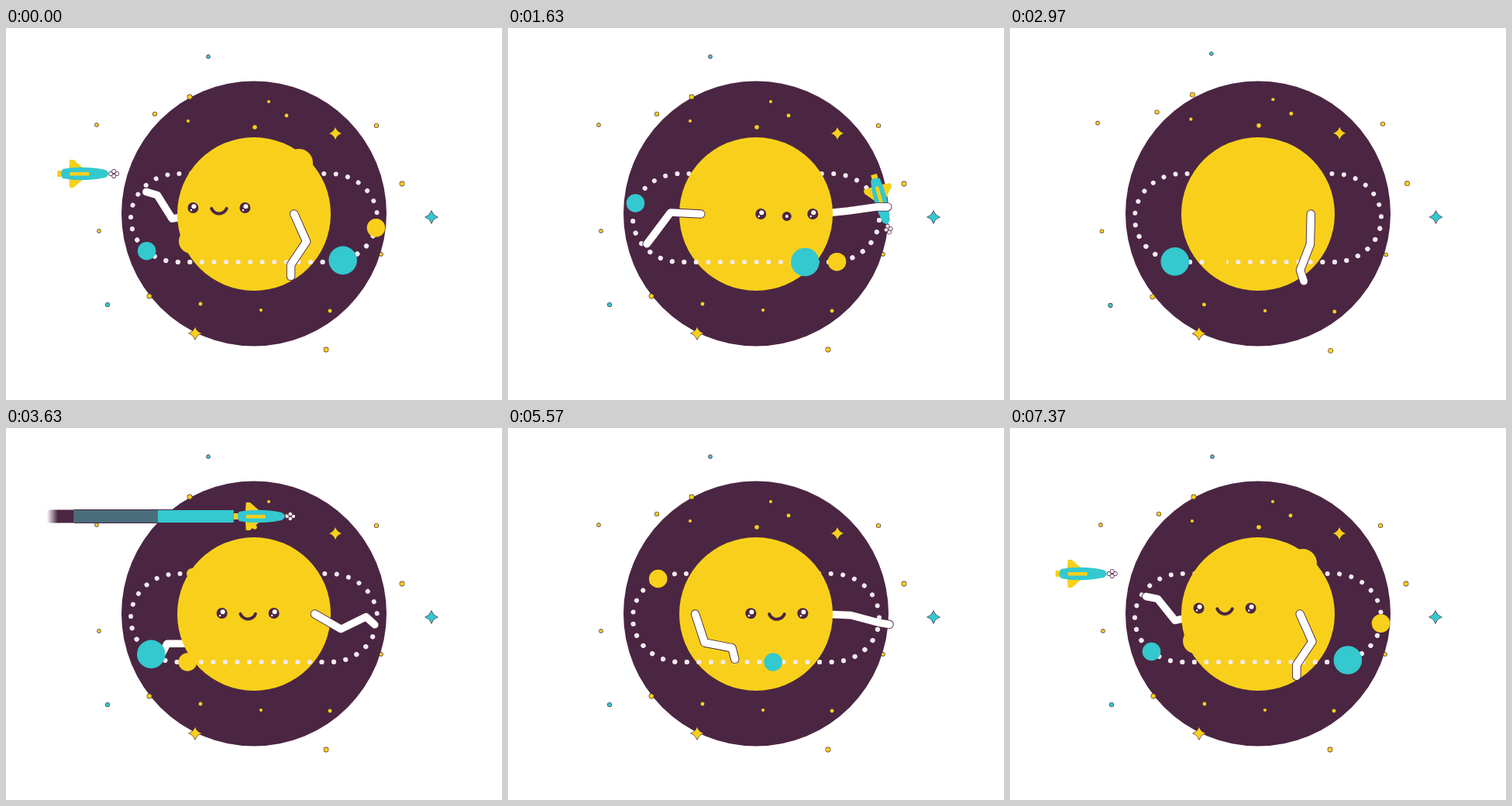
An HTML page with a canvas that plays this animation: 640x480 px, repeating every 7410 ms.

```html
<!DOCTYPE html>
<html lang="en">
<head>
<meta charset="utf-8">
<title>Spinning sun</title>
<style>
  html, body { margin: 0; width: 100%; height: 100%; overflow: hidden; background: #fff; }
  canvas { display: block; }
</style>
</head>
<body>
<canvas id="stage" width="640" height="480"></canvas>
<script>
const ctx = document.getElementById('stage').getContext('2d');
const LOOP = 7410, GRAB = 1630, THROW = 2180, TAU = Math.PI * 2, DEG = Math.PI / 180;
const PURPLE = '#4b2642', YELLOW = '#f8d01b', TEAL = '#34c8cf', SMOKE = '#496d7b', WHITE = '#fff', PALE = '#f3eaf0';
const CX = 320, CY = 240, SUN = 99;

// Orbit: two straight runs joined by half ellipses, measured clockwise from the top left.
const LEFT = 222, RIGHT = 418, MID = 245, RX = 61, RY = 57;
const RUN = RIGHT - LEFT, BEND = Math.PI * (RX + RY) / 2, LAP = 2 * (RUN + BEND);
const GAP = LAP / 49;

// Smooth interpolation through keys [time, value] without overshoot.
function track(keys) {
  const n = keys.length;
  const slope = keys.slice(1).map((k, i) => (k[1] - keys[i][1]) / (k[0] - keys[i][0]));
  const tangent = keys.map((_, i) => {
    const a = slope[Math.max(i - 1, 0)], b = slope[Math.min(i, n - 2)];
    return a * b > 0 ? 2 * a * b / (a + b) : 0;
  });
  return t => {
    if (t <= keys[0][0]) return keys[0][1];
    if (t >= keys[n - 1][0]) return keys[n - 1][1];
    let i = 0;
    while (t > keys[i + 1][0]) i++;
    const h = keys[i + 1][0] - keys[i][0], u = (t - keys[i][0]) / h, v = 1 - u;
    return keys[i][1] * v * v * (1 + 2 * u) + keys[i + 1][1] * u * u * (3 - 2 * u)
      + h * u * v * (tangent[i] * v - tangent[i + 1] * u);
  };
}

// Key poses: height of the face and the angles of upper arm, forearm and hand.
const HANG = [66, 124, 90];
const START = { face: 232, left: [171, 238, 196], right: HANG };
const POSES = [
  { at: 0, ...START },
  { at: GRAB, face: 240, left: [183, 127, 127], right: [-6, -8, 0] },
  { at: 2330, face: 240, left: [111, 45, 28], right: [60, 20, 20] },
  { at: 3630, face: 239, left: [79, 180, 117], right: [30, -26, 42] },
  { at: 4770, face: 236, left: [66, -12, 74], right: [-55, -83, -63] },
  { at: 6430, face: 243, left: [88, 68, 81], right: HANG },
  { at: LOOP, ...START }
];
const poseTrack = pick => track(POSES.map((p, i) => [p.at, pick(p, i)]));
const faceY = poseTrack(p => p.face);
const yaw = track([[0, -37], [GRAB, 32], [THROW, -110], [2330, -261], [3630, -726], [4770, -697], [6430, -705], [LOOP, -757]]);

// Shoulders sit on the turning sun; "seat" is their angle from the face.
const BONES = [39, 36, 15];
const arms = [['left', -90], ['right', 75]].map(([side, seat]) => ({
  seat, angles: BONES.map((_, j) => poseTrack(p => p[side][j]))
}));

// Distance along the orbit at each key pose; every planet does one lap per loop.
const planet = (color, r, stops) =>
  ({ color, r, s: poseTrack((_, i) => i < stops.length ? stops[i] : stops[0] + LAP) });
const planets = [
  planet(TEAL, 11.8, [620, 690, 737, 900, 1058, 1352]),
  planet(YELLOW, 11.8, [302, 375, 486, 565, 609, 915]),
  planet(TEAL, 18.3, [365, 416, 551, 613, 668, 1097])
];

const burst = track([[1900, 0], [2330, 1], [2480, 1], [3070, 0]]);
const approach = track([[-950, -275], [0, -122], [800, 60], [1300, 235], [GRAB, 262]]);

const STARS = [
  [117, 125], [192, 111], [237, 89], [339, 95], [362, 113], [321, 128], [235, 120], [478, 126],
  [511, 201], [484, 292], [418, 365], [413, 415], [329, 364], [251, 356], [185, 346], [120, 262]
];
const TEAL_STARS = [[261, 37], [131, 357]];
const SPARKS = [[425, 136, YELLOW], [244, 394, YELLOW], [549, 244, TEAL]];

// Lumps that swell out of the sun around a given time.
const LUMPS = [
  { at: 0, x: 378, y: 174, r: 18 }, { at: 0, x: 239, y: 275, r: 16 },
  { at: 3630, x: 240, y: 188, r: 7 }, { at: 4770, x: 367, y: 169, r: 18 }
];

function orbit(s) {
  if (s > 0) s %= LAP;
  if (s < RUN) return { x: LEFT + s, y: MID - RY, turn: 0 };
  s -= RUN;
  if (s < BEND) {
    const u = s / BEND * Math.PI;
    return { x: RIGHT + RX * Math.sin(u), y: MID - RY * Math.cos(u), turn: u };
  }
  s -= BEND;
  if (s < RUN) return { x: RIGHT - s, y: MID + RY, turn: Math.PI };
  const u = (s - RUN) / BEND * Math.PI;
  return { x: LEFT - RX * Math.sin(u), y: MID + RY * Math.cos(u), turn: Math.PI + u };
}

function disc(x, y, r, color) {
  ctx.fillStyle = color;
  ctx.beginPath();
  ctx.arc(x, y, r, 0, TAU);
  ctx.fill();
}

function rimmed(x, y, r, color) {
  disc(x, y, r + .6, PURPLE);
  disc(x, y, r, color);
}

function strokeLine(width, color) {
  ctx.lineWidth = width;
  ctx.strokeStyle = color;
  ctx.stroke();
}

function clipped(shape, paint) {
  ctx.save();
  ctx.beginPath();
  shape();
  ctx.clip();
  paint();
  ctx.restore();
}

function spark(x, y, color) {
  ctx.beginPath();
  ctx.moveTo(x, y - 8);
  for (let i = 1; i <= 4; i++) {
    const a = i * TAU / 4, m = a - TAU / 8;
    ctx.quadraticCurveTo(x + 2.8 * Math.sin(m), y - 2.8 * Math.cos(m), x + 8 * Math.sin(a), y - 8 * Math.cos(a));
  }
  strokeLine(1.2, PURPLE);
  ctx.fillStyle = color;
  ctx.fill();
}

function drawStars(t) {
  const b = burst(t);
  const place = (x, y, k) => [x + (x - CX) * k * b, y + (y - CY) * k * b];
  const star = color => ([x, y], i) =>
    rimmed(...place(x, y, y < 130 ? .1 : .04), 2.1 + i % 3 * .35, color);
  STARS.forEach(star(YELLOW));
  TEAL_STARS.forEach(star(TEAL));
  SPARKS.forEach(([x, y, color]) => spark(...place(x, y, .012), color));
}

function drawDots(t) {
  const p = t / LOOP, shift = 7 * GAP * p + 10 * Math.sin(Math.PI * p) ** 4;
  ctx.save();
  ctx.beginPath();
  ctx.moveTo(LEFT, MID - RY);
  ctx.lineTo(RIGHT, MID - RY);
  ctx.ellipse(RIGHT, MID, RX, RY, 0, -Math.PI / 2, Math.PI / 2);
  ctx.lineTo(LEFT, MID + RY);
  ctx.ellipse(LEFT, MID, RX, RY, 0, Math.PI / 2, Math.PI * 1.5);
  ctx.setLineDash([.01, GAP - .01]);
  ctx.lineDashOffset = -(1.4 + shift);
  ctx.lineCap = 'round';
  strokeLine(6, PALE);
  ctx.restore();
}

function drawPlanets(t, front) {
  planets.forEach(p => {
    const { x, y } = orbit(p.s(t));
    if ((y > MID) === front) disc(x, y, p.r, p.color);
  });
}

function armPose(arm, t) {
  const seat = (yaw(t) + arm.seat) * DEG;
  let x = CX + 84 * Math.sin(seat), y = CY;
  const points = [[x, y]];
  BONES.forEach((length, j) => {
    const a = arm.angles[j](t) * DEG;
    points.push([x += length * Math.cos(a), y += length * Math.sin(a)]);
  });
  return { points, hand: { x, y }, front: Math.cos(seat) > 0 };
}

function drawArms(poses, front) {
  ctx.lineCap = ctx.lineJoin = 'round';
  poses.filter(p => p.front === front).forEach(({ points }) => {
    ctx.beginPath();
    points.forEach(p => ctx.lineTo(...p));
    strokeLine(11.4, PURPLE);
    strokeLine(9.6, WHITE);
  });
}

function drawSun(t) {
  disc(CX, CY, SUN, YELLOW);
  LUMPS.forEach(({ at, x, y, r }) => {
    const gap = Math.abs(t - at), away = Math.min(gap, LOOP - gap) / 500;
    const out = .7 + .3 * Math.exp(-away * away);
    disc(CX + (x - CX) * out, CY + (y - CY) * out, r, YELLOW);
  });
}

function drawFace(t) {
  const angle = yaw(t) * DEG, facing = Math.cos(angle);
  if (facing <= 0) return;
  clipped(() => ctx.arc(CX, CY, SUN, 0, TAU), () => {
    ctx.translate(CX + 75 * Math.sin(angle), faceY(t));
    ctx.scale(Math.min(1, facing * 1.3), 1);
    for (const side of [-33.5, 33.5]) {
      disc(side, 0, 7, PURPLE);
      disc(side + 1, -1.8, 3, WHITE);
      disc(side - 2.5, 3, 1.2, WHITE);
    }
    if (t > 1250 && t < THROW) {
      disc(0, 3, 6, PURPLE);
      disc(0, 3, 2, WHITE);
    } else {
      ctx.beginPath();
      ctx.lineCap = 'round';
      ctx.arc(0, -3, 10.5, .12 * Math.PI, .88 * Math.PI);
      strokeLine(4, PURPLE);
    }
  });
}

// Follows the orbit, is swung by the hand, thrown left, then races back across the top.
function rocketState(t, arm) {
  if (t > 6430) t -= LOOP;
  const held = arm.front ? 'hand' : 'back';
  if (t < GRAB) {
    const p = orbit(approach(t));
    return { ...p, turn: p.turn * 1.18, layer: p.x > RIGHT ? 'hand' : 'back' };
  }
  if (t < THROW) {
    const u = (t - GRAB) / (THROW - GRAB);
    return { x: arm.hand.x - 9 * (1 - u), y: arm.hand.y - 9 * (1 - u), turn: (75 + 105 * u) * DEG, layer: held };
  }
  if (t < 2560) {
    return { x: 340 - (t - THROW) * 2.96, y: 302, turn: Math.PI, layer: 'front', tail: [175, SMOKE] };
  }
  if (t > 3150 && t < 4400) {
    return { x: 327 + (t - 3630) * .76, y: 114, turn: 0, layer: 'front', tail: [35, PURPLE] };
  }
  return null;
}

// Drawn in the rocket's own frame, so it always streams out behind.
function drawTrail([length, color]) {
  const bright = -34 - 98, dim = bright - 108;
  const fade = ctx.createLinearGradient(dim, 0, dim - length, 0);
  fade.addColorStop(0, color);
  fade.addColorStop(.6, color + (color === SMOKE ? '18' : 'ff'));
  fade.addColorStop(1, color + '00');
  ctx.fillStyle = fade;
  ctx.fillRect(dim - length, -8.5, length, 17);
  ctx.fillStyle = PURPLE;
  ctx.fillRect(dim, -9, 206, 18);
  ctx.fillStyle = SMOKE;
  ctx.fillRect(dim, -8, 108, 16);
  ctx.fillStyle = TEAL;
  ctx.fillRect(bright, -8, 98, 16);
}

function drawRocket({ x, y, turn, tail }) {
  ctx.save();
  ctx.translate(x, y);
  ctx.rotate(turn);
  if (tail) {
    // The thrown streak begins where the hand let go.
    const reach = turn ? 340 - x : 400;
    clipped(() => ctx.rect(-reach, -10, reach, 20), () => drawTrail(tail));
  }
  ctx.fillStyle = YELLOW;
  ctx.fillRect(-34, -4, 8, 8);
  for (const side of [-1, 1]) {
    ctx.beginPath();
    ctx.moveTo(-19, 5 * side);
    ctx.lineTo(-18, 18 * side);
    ctx.lineTo(-13, 18 * side);
    ctx.lineTo(2, 5 * side);
    ctx.fill();
  }
  ctx.fillStyle = TEAL;
  ctx.beginPath();
  ctx.moveTo(-27, -6);
  ctx.quadraticCurveTo(-2, -11, 28, -5);
  ctx.quadraticCurveTo(36, 0, 28, 5);
  ctx.quadraticCurveTo(-2, 11, -27, 6);
  ctx.quadraticCurveTo(-31, 0, -27, -6);
  ctx.fill();
  ctx.fillStyle = YELLOW;
  ctx.fillRect(-18, -2, 25, 4.5);
  for (let i = 0; i < 4; i++) rimmed(39 + 4 * Math.cos(i * TAU / 4), 3 * Math.sin(i * TAU / 4), 2.3, PALE);
  ctx.restore();
}

function draw(t) {
  const poses = arms.map(a => armPose(a, t));
  const rocket = rocketState(t, poses[1]);
  const rocketOn = layer => { if (rocket && rocket.layer === layer) drawRocket(rocket); };

  ctx.fillStyle = WHITE;
  ctx.fillRect(0, 0, 640, 480);
  disc(CX, CY - .5, 171, PURPLE);
  drawStars(t);
  drawDots(t);
  drawPlanets(t, false);
  rocketOn('back');
  drawArms(poses, false);
  drawSun(t);
  drawFace(t);
  clipped(() => ctx.rect(0, MID, 640, 240), () => drawDots(t));
  rocketOn('front');
  rocketOn('hand');
  drawArms(poses, true);
  drawPlanets(t, true);
}

const begin = performance.now();
function tick() {
  draw((performance.now() - begin) % LOOP);
  requestAnimationFrame(tick);
}
tick();
</script>
</body>
</html>
```
